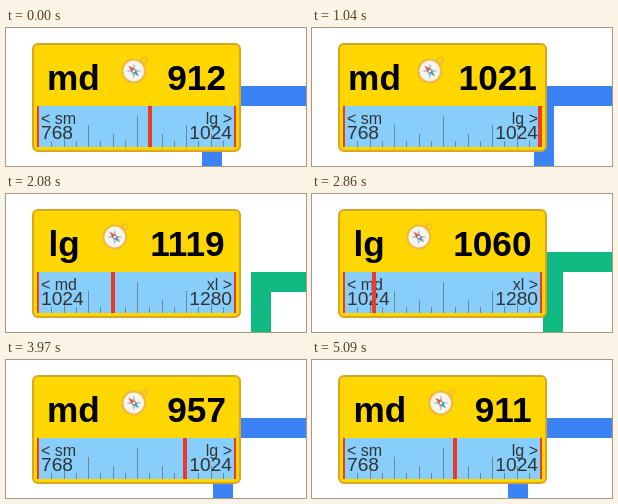
An HTML page that plays this animation: 300x138 px, repeating every 5510 ms.

```html
<!DOCTYPE html>
<html lang="en">
<head>
<meta charset="utf-8">
<title>Breakpoint ruler</title>
<style>
  html, body { margin: 0; width: 100%; height: 100%; overflow: hidden; background: #fff; }
  body { position: relative; font-family: "Liberation Sans", Arial, sans-serif; }
  body * { box-sizing: border-box; }
  #page { position: absolute; width: 400px; height: 300px; border: 20px solid; }
  #card {
    position: absolute; left: 26px; top: 15px; width: 209px; height: 109px;
    border: 2px solid #daa520; border-radius: 6px; background: #ffd700;
  }
  #title {
    position: absolute; left: 0; right: 0; top: 13px;
    display: flex; justify-content: space-evenly;
    font: bold 35.2px/40px "Liberation Sans", Arial, sans-serif; color: #000;
  }
  #title svg { flex: none; width: 41.5px; height: 40px; overflow: visible; }
  #ruler {
    position: absolute; left: 3px; top: 61px; width: 199px; height: 41px;
    background: #87cefa; border: solid #ee3a2a; border-width: 0 2px; color: #333;
  }
  #ruler * { position: absolute; white-space: pre; }
  .name { top: 4px; font-size: 16px; line-height: 17px; }
  .edge { top: 17px; font-size: 19.2px; line-height: 20px; }
  .lo { left: 2px; }
  .hi { right: 2px; }
  .tick { bottom: 0; width: 1px; background: #6f8796; }
  #mark { top: 0; left: -1px; width: 4px; height: 41px; background: #ee3a2a; }
</style>
</head>
<body>
<div id="page"></div>
<div id="card">
  <div id="title">
    <span id="size"></span>
    <svg viewBox="-20.75 -13 41.5 40">
      <circle cx="10.5" cy="-10.5" r="2.8" fill="none" stroke="#efb93a" stroke-width="1.6"/>
      <circle r="12.6" fill="#efb93a"/>
      <circle r="10.4" fill="#f8f5ee"/>
      <path d="M0-8 1.6-1.6 8 0 1.6 1.6 0 8-1.6 1.6-8 0-1.6-1.6Z" fill="#9cc0cc"/>
      <path d="M-5.5-5.5 1.6-1.6-1.6 1.6Z" fill="#e2543c"/>
      <path d="M5.5 5.5 1.6-1.6-1.6 1.6Z" fill="#5f93a8"/>
      <circle r="1.2" fill="#fff"/>
    </svg>
    <span id="width"></span>
  </div>
  <div id="ruler">
    <span class="name lo" id="prev"></span>
    <span class="name hi" id="next"></span>
    <span class="edge lo" id="min"></span>
    <span class="edge hi" id="max"></span>
    <div id="mark"></div>
  </div>
</div>
<script>
const LOOP = 5510;
const $ = id => document.getElementById(id);

// Runs of even updates: first, last, count
const RUNS = [
  [420, 970, 9], [1040, 1590, 9], [1660, 2150, 8], [2220, 2720, 8], [2790, 3280, 8],
  [3350, 3900, 9], [3970, 4460, 8], [4530, 4740, 4], [4880, 4950, 2], [5090, 5090, 1]
];

// Dragged width over time
const KEYS = [
  [350, 912], [970, 1014], [1040, 1021], [2080, 1119], [2290, 1124], [2860, 1060],
  [3280, 1010], [3490, 988], [4460, 930], [4740, 914], [4950, 912], [5090, 911]
];

const MD = { size: 'md', prev: '< sm', next: 'lg >', min: 768, max: 1024, color: '#3b82f6' };
const LG = { size: 'lg', prev: '< md', next: 'xl >', min: 1024, max: 1280, color: '#10b981' };

const slope = i => (KEYS[i + 1][1] - KEYS[i][1]) / (KEYS[i + 1][0] - KEYS[i][0]);

// Monotone tangent at a key
function tangent(i) {
  if (i === 0 || i === KEYS.length - 1) return 0;
  const a = slope(i - 1), b = slope(i);
  return a * b > 0 ? 2 * a * b / (a + b) : 0;
}

function snap(t) {
  const run = RUNS.filter(r => r[0] <= t).pop();
  if (!run) return 0;
  const [from, to, n] = run;
  if (n === 1) return from;
  const gap = (to - from) / (n - 1);
  return from + gap * Math.min(n - 1, Math.floor((t - from) / gap + 1e-6));
}

function widthAt(t) {
  if (t <= KEYS[0][0]) return KEYS[0][1];
  const i = KEYS.findIndex(k => k[0] >= t - 1e-6) - 1;
  const [t0, w0] = KEYS[i], [t1, w1] = KEYS[i + 1];
  const d = t1 - t0, u = (t - t0) / d, v = 1 - u;
  return Math.round(
    w0 * (1 + 2 * u) * v * v + w1 * u * u * (3 - 2 * u) +
    d * u * v * (tangent(i) * v - tangent(i + 1) * u)
  );
}

function addTicks() {
  for (let i = 1; i < 16; i++) {
    const tick = document.createElement('div');
    tick.className = 'tick';
    tick.style.left = Math.round(12.25 * i) + 'px';
    tick.style.height = (i % 8 === 0 ? 31 : i % 4 === 0 ? 22 : i % 2 === 0 ? 13 : 6) + 'px';
    $('ruler').prepend(tick);
  }
}

let shown;
function draw(t) {
  const w = widthAt(snap(t));
  if (w === shown) return;
  shown = w;
  const band = w < 1024 ? MD : LG;
  for (const id of ['size', 'prev', 'next', 'min', 'max']) $(id).textContent = band[id];
  $('width').textContent = w;
  const x = Math.round(196 * (w - band.min) / (band.max - band.min));
  $('mark').style.transform = `translateX(${x}px)`;
  Object.assign($('page').style, {
    left: Math.round(196 + (w - 912) * 0.2366) + 'px',
    top: (w > 1090 ? 78 : 58) + 'px',
    borderColor: band.color
  });
}

addTicks();
const start = performance.now();
function frame() {
  draw((performance.now() - start) % LOOP);
  requestAnimationFrame(frame);
}
frame();
</script>
</body>
</html>
```
